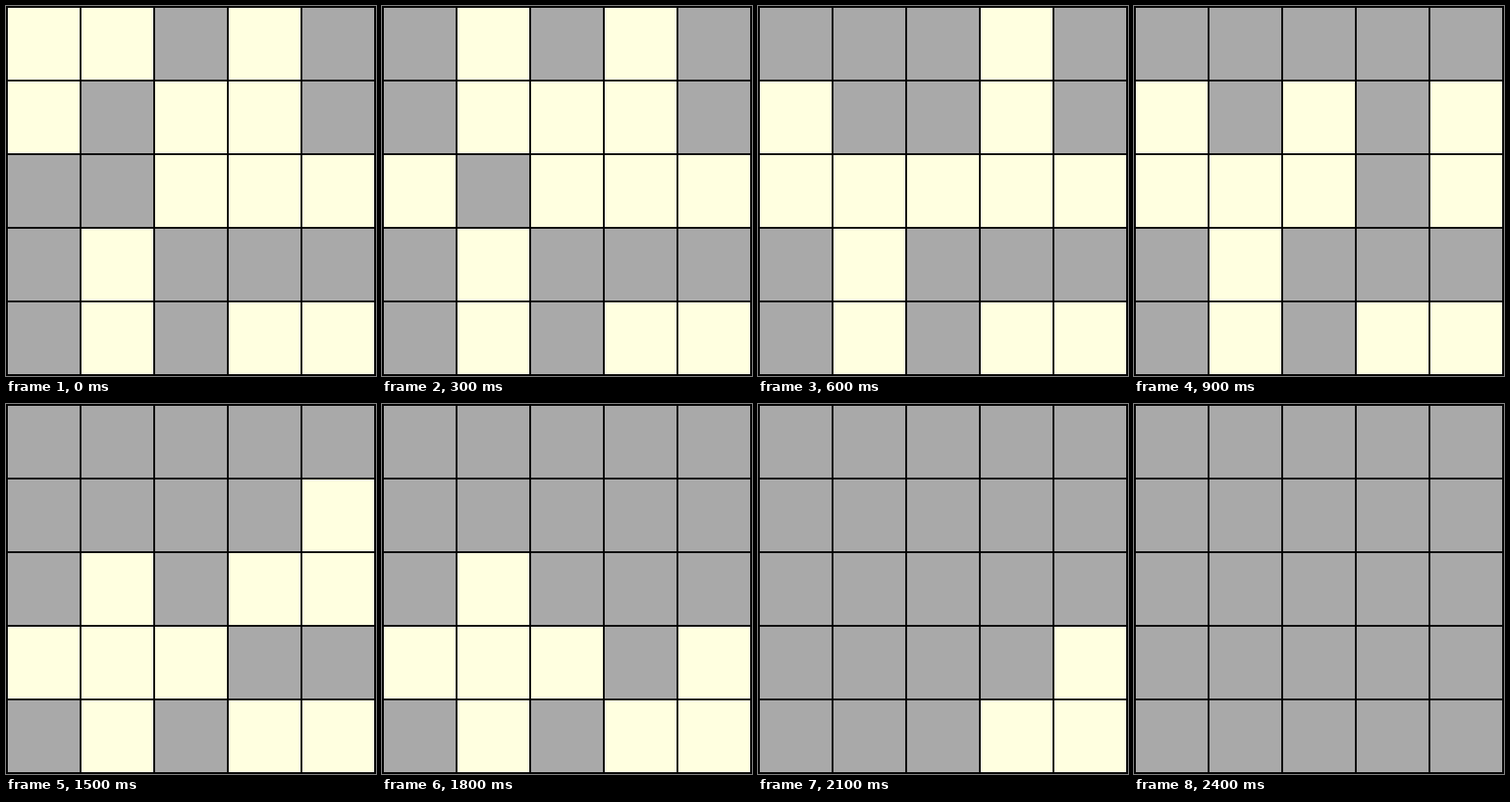
These frames come from a looping animation (402x402 px, 2.7 s). An HTML page:

```html
<!DOCTYPE html>
<html lang="en">
<head>
<meta charset="utf-8">
<title>Lights puzzle</title>
<style>
  html, body { margin: 0; width: 100%; height: 100%; overflow: hidden; background: #000; }
  #board {
    display: grid;
    grid-template: repeat(5, 78px) / repeat(5, 78px);
    gap: 2px;
    padding: 2px;
    width: 398px;
    height: 398px;
  }
  #board i { background: #a9a9a9; }
  #board i.on { background: #ffffe0; }
</style>
</head>
<body>
<div id="board"></div>
<script>
  const SIZE = 5, STEP = 300;
  const start = ["11010", "10110", "00111", "01000", "01011"];
  // Each press, as [row, column], flips a cell and its direct neighbours.
  const presses = [[1, 0], [1, 1], [1, 3], [2, 0], [2, 2], [2, 4], [3, 1], [4, 4]];

  const press = (lights, [row, col]) => lights.map((lit, i) => {
    const distance = Math.abs(Math.floor(i / SIZE) - row) + Math.abs(i % SIZE - col);
    return distance <= 1 ? !lit : lit;
  });

  const states = [[...start.join("")].map(c => c === "1")];
  for (const move of presses) states.push(press(states[states.length - 1], move));

  const board = document.getElementById("board");
  const cells = states[0].map(() => board.appendChild(document.createElement("i")));

  let shown = -1;
  function show(index) {
    if (index === shown) return;
    shown = index;
    cells.forEach((cell, i) => cell.classList.toggle("on", states[index][i]));
  }

  let origin;
  function frame(now) {
    origin ??= now;
    show(Math.floor(Math.max(0, now - origin) / STEP) % states.length);
    requestAnimationFrame(frame);
  }
  show(0);
  requestAnimationFrame(frame);
</script>
</body>
</html>
```
